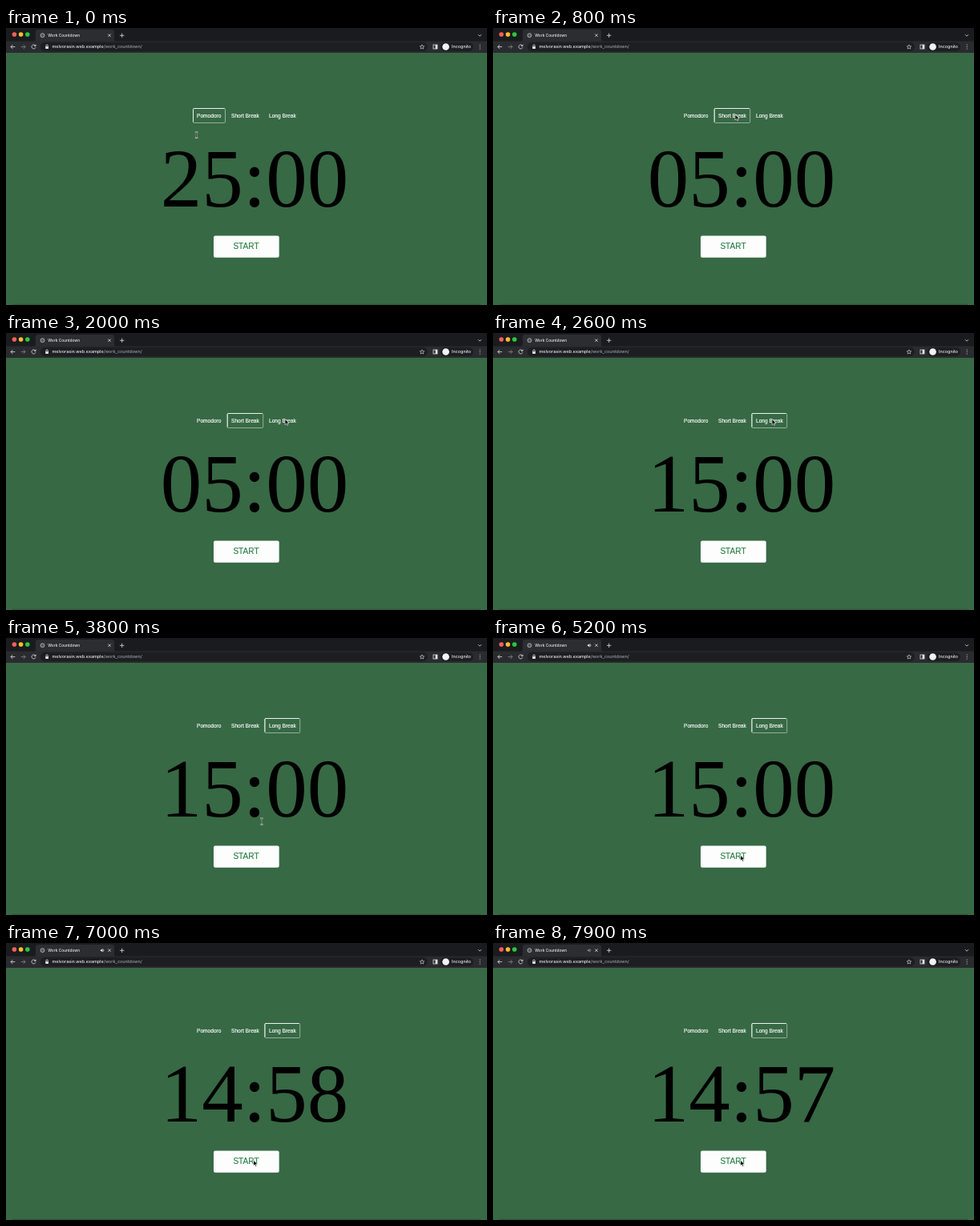
An HTML page that plays this animation: 600 by 346 pixels, repeating every 8000 ms.

```html
<!DOCTYPE html>
<html lang="en">
<head>
<meta charset="utf-8">
<title>Work Countdown</title>
<style>
  html, body { margin: 0; width: 100%; height: 100%; overflow: hidden; background: #376945; }
  svg { display: block; width: 100vw; height: 100vh; }
  .ui { font-family: Inter, Roboto, sans-serif; font-weight: 500; fill: #e8eaed; }
  .page { font-family: "Liberation Sans", Arial, sans-serif; fill: #fff; stroke: #fff; stroke-width: .15; }
  .page.start { fill: #2a8048; stroke: #2a8048; }
  .icon { fill: none; stroke: #dfe1e5; stroke-width: .8; }
</style>
</head>
<body>
<svg viewBox="0 0 600 346">
  <defs>
    <path id="ibeam" fill="none" d="M-1.8-3.8q1.8 0 1.8 1.2v5.2q0 1.2-1.8 1.2M1.8-3.8q-1.8 0-1.8 1.2v5.2q0 1.2 1.8 1.2M-1 1h2"/>
  </defs>
  <rect width="600" height="346" fill="#376945"/>
  <rect x="8" y="344.5" width="584" height="1.5" opacity=".15"/>

  <!-- Browser frame -->
  <rect width="600" height="17" fill="#1a1b1e"/>
  <path d="M34 17q3 0 3-3V5q0-3 3-3h92q3 0 3 3v9q0 3 3 3z" fill="#2c2d31"/>
  <rect y="16.5" width="600" height="14.5" fill="#2a2b2f"/>
  <rect x="43" y="17.8" width="483" height="11.4" rx="5.7" fill="#1d1e21"/>
  <rect x="542" y="18" width="41" height="11" rx="5.5" fill="#1d1e21"/>
  <circle cx="10.4" cy="8" r="2.8" fill="#fe5f57"/>
  <circle cx="18.6" cy="8" r="2.8" fill="#febc2e"/>
  <circle cx="26.8" cy="8" r="2.8" fill="#28c840"/>
  <circle cx="45.5" cy="9.2" r="2.5" fill="#55585c" stroke="#c4c7cb" stroke-width=".7"/>
  <g class="icon">
    <path d="M127.3 7.5l3.4 3.4m0-3.4l-3.4 3.4M142 9.3h5.4M144.7 6.6v5.4M589 8.2l2 2 2-2"/>
    <path d="M11.3 23.5H6m2.4-2.5L6 23.5 8.4 26"/>
    <path d="M18.8 23.5h5.3M21.7 21l2.4 2.5L21.7 26" stroke="#85888c"/>
    <path d="M36.7 22.2a2.5 2.5 0 1 0 .2 2M37.1 20.6v1.9h-2"/>
    <path d="M49.9 23v-.9a1.2 1.2 0 0 1 2.4 0v.9"/>
    <path d="M519 20.8l.8 1.9 2 .1-1.5 1.3.5 2-1.8-1.1-1.8 1.1.5-2-1.5-1.3 2-.1z" stroke-width=".6"/>
    <rect x="533" y="21" width="5" height="5"/>
  </g>
  <rect x="535.6" y="21" width="2.4" height="5" fill="#dfe1e5"/>
  <rect x="49.2" y="22.9" width="3.8" height="3" rx=".4" fill="#dfe1e5"/>
  <circle cx="548.6" cy="23.5" r="4.3" fill="#f1f3f4"/>
  <path d="M591.2 21v.01m0 2.49v.01m0 2.49v.01" stroke="#dfe1e5" stroke-width="1.2" stroke-linecap="round"/>
  <g class="ui">
    <text x="52.3" y="11" font-size="4.8">Work Countdown</text>
    <text x="57.5" y="25.4" font-size="5.4">melvorasin.web.example<tspan fill="#9aa0a6">/work_countdown/</tspan></text>
    <text x="556" y="25.4" font-size="5.4">Incognito</text>
  </g>
  <g id="speaker">
    <path d="M117.8 8.4h1.1l1.6-1.5v4.6l-1.6-1.5h-1.1z" fill="#e8eaed"/>
    <path d="M121.3 7.7q1.3 1.5 0 3" class="icon"/>
  </g>

  <!-- Page -->
  <g class="page" font-size="6.6">
    <text x="238" y="111.5">Pomodoro</text>
    <text x="281" y="111.5">Short Break</text>
    <text x="328" y="111.5">Long Break</text>
  </g>
  <g fill="none">
    <rect id="focus" y="100.5" height="18" rx="1.3" stroke="#a3b7a9" stroke-width=".9"/>
    <path id="shine" stroke="#edf2ed"/>
  </g>
  <text id="clock" x="310" y="222.7" font-size="103" text-anchor="middle" font-family="Liberation Serif, Times, serif"></text>
  <rect x="259" y="259.5" width="81.7" height="27.2" rx="2" fill="#fcfdfc"/>
  <text class="page start" x="283.4" y="276.4" font-size="10.1">START</text>

  <g id="cursor">
    <path id="arrow" d="M0 0v7l1.6-1.5 1 2.4 1.2-.5-1-2.3h2.2z" stroke="#fff" stroke-width=".6" stroke-linejoin="round"/>
    <g id="beam">
      <use href="#ibeam" stroke="#d5ddd7" stroke-width="1.5"/>
      <use href="#ibeam" stroke="#2c3a30" stroke-width=".6"/>
    </g>
  </g>
</svg>
<script>
const LOOP = 8000, STEP = 100;
const el = id => document.getElementById(id);

// time, x, y of the pointer
const pointer = [
  [0, 237.6, 133.5], [300, 299.5, 107], [400, 299.5, 107], [800, 302, 108],
  [1400, 302, 108], [2000, 348, 107.5],
  [3400, 348, 107.5], [4000, 308.8, 271.3], [LOOP, 308.8, 271.3]
];
// left edge and width of each mode button
const work = [233.5, 40], short = [276.2, 44.5], long = [322.9, 43.8];
// time, clock text, focused button
const states = [
  [0, "25:00", work], [800, "05:00", short], [2600, "15:00", long],
  [5300, "14:59", long], [6300, "14:58", long], [7300, "14:57", long]
];

function pointerAt(t) {
  const i = pointer.findIndex(p => p[0] > t);
  const [t0, x0, y0] = pointer[i - 1], [t1, x1, y1] = pointer[i];
  const k = (t - t0) / (t1 - t0), ease = k * k * (3 - 2 * k);
  return [x0 + (x1 - x0) * ease, y0 + (y1 - y0) * ease];
}

function draw(now) {
  const t = Math.floor(now % LOOP / STEP) * STEP;
  const [, time, [left, width]] = states.findLast(s => s[0] <= t);
  el("clock").textContent = time;
  el("focus").setAttribute("x", left);
  el("focus").setAttribute("width", width);
  el("shine").setAttribute("d", `M${left} 117.5v-16q0-1 1-1h${width - 2}`);

  const [x, y] = pointerAt(t), overText = y > 124 && y < 240;
  el("cursor").setAttribute("transform", `translate(${x} ${y})`);
  el("arrow").style.display = overText ? "none" : "";
  el("beam").style.display = overText ? "" : "none";

  const fade = Math.min(1, Math.max(0, (t - 7400) / 500));
  el("speaker").style.opacity = t < 5200 ? 0 : 1 - fade * .5;
  requestAnimationFrame(draw);
}
requestAnimationFrame(draw);
</script>
</body>
</html>
```
